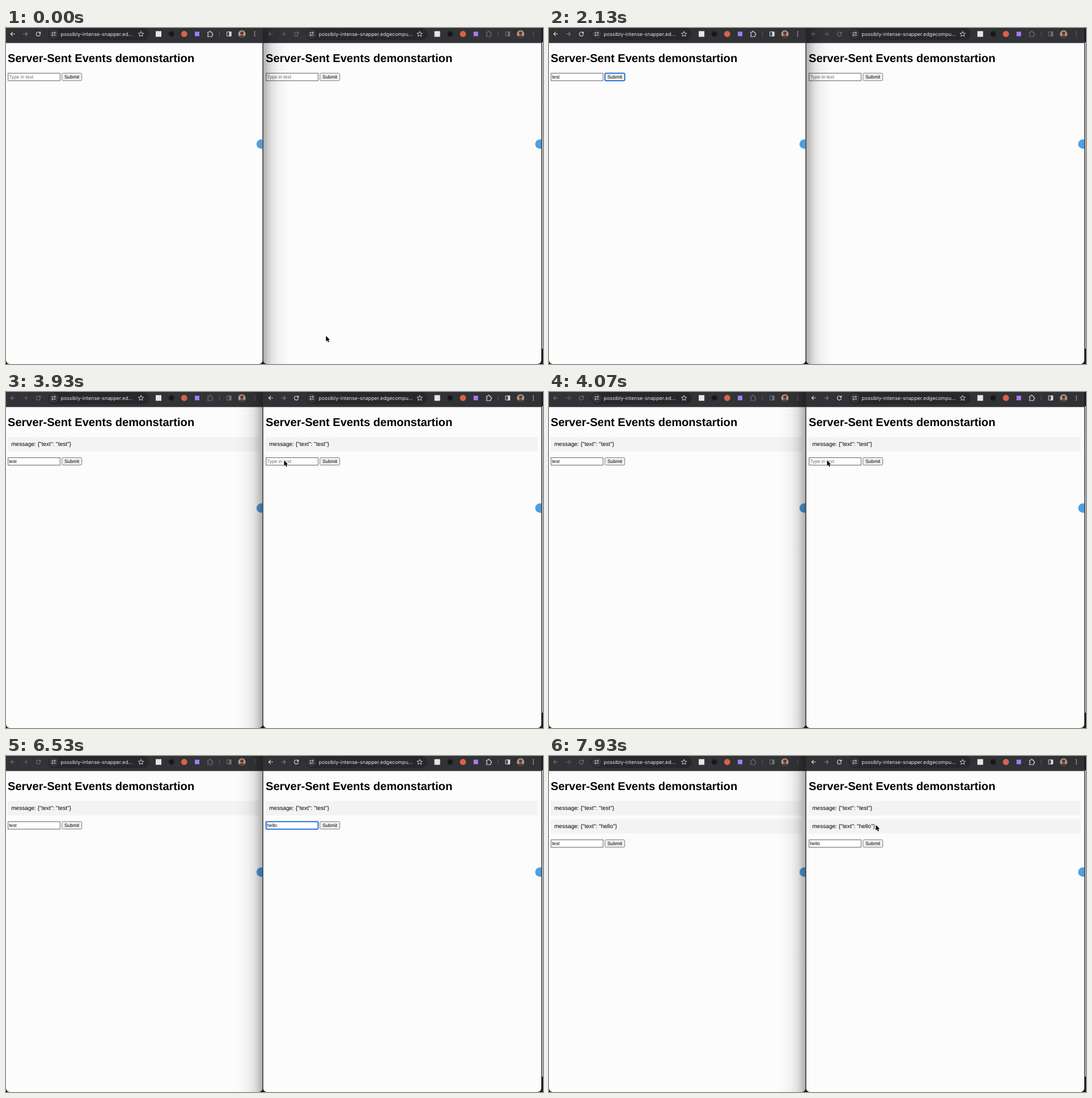
Animation, 947 px wide and 592 px high, one loop 8000 ms. Source, as an HTML page with a canvas:

```html
<!DOCTYPE html>
<html lang="en">
<head>
<meta charset="utf-8">
<title>Server-Sent Events demonstration</title>
<style>
html, body { margin: 0; width: 100%; height: 100%; overflow: hidden; background: #1c1c1e; }
canvas { display: block; width: 947px; height: 592px; }
</style>
</head>
<body>
<canvas id="stage" width="947" height="592"></canvas>
<script>
const LOOP = 8000, SPLIT = 453, RIGHT_EDGE = 944, H = 592;
const SANS = '"Liberation Sans", Arial, sans-serif';
const UI = 'Inter, Roboto, sans-serif';
const BLUE = '#0f66d0';
const ctx = document.getElementById('stage').getContext('2d');
ctx.textRendering = 'geometricPrecision';

// Moments of the scene, in ms
const T = {
  leftFocus: 1070, leftTab: 1870, press: 2200, release: 2330, firstMessage: 2470,
  switchWindow: 3930, rightFocus: 4730, rightClick: 7470, secondMessage: 7600
};
const LEFT_KEYS = [1270, 1400, 1530, 1670];
const RIGHT_KEYS = [5600, 5730, 5860, 5960, 6080];

// Pointer stops: time, x, y
const PATH = [
  [0, 564, 542], [70, 564, 542], [130, 88, 86], [2900, 88, 86], [3000, 80, 98],
  [3130, 54, 113], [3200, 50, 114], [3270, 73, 114], [3330, 240, 111], [3400, 457, 106],
  [3670, 457, 106], [3870, 490, 120], [6800, 490, 120], [7200, 576, 121], [8000, 576, 121]
];

function text(str, x, y, size, color, family = SANS, weight = 400) {
  ctx.font = `${weight} ${size}px ${family}`;
  ctx.fillStyle = color;
  ctx.fillText(str, x, y);
}

function rect(x, y, w, h, color) {
  ctx.fillStyle = color;
  ctx.fillRect(x, y, w, h);
}

function rounded(x, y, w, h, r, fill, stroke, line = 1) {
  ctx.beginPath();
  ctx.roundRect(x, y, w, h, r);
  if (fill) { ctx.fillStyle = fill; ctx.fill(); }
  if (stroke) { ctx.strokeStyle = stroke; ctx.lineWidth = line; ctx.stroke(); }
}

function disc(x, y, r, color) {
  ctx.beginPath();
  ctx.arc(x, y, r, 0, 7);
  ctx.fillStyle = color;
  ctx.fill();
}

function trace(d, x, y, color, line = 1.2, fill) {
  ctx.save();
  ctx.translate(x, y);
  const p = new Path2D(d);
  if (fill) { ctx.fillStyle = fill; ctx.fill(p); }
  ctx.strokeStyle = color;
  ctx.lineWidth = line;
  ctx.lineJoin = 'round';
  ctx.stroke(p);
  ctx.restore();
}

function star(x, y, color) {
  let d = '';
  for (let i = 0; i < 10; i++) {
    const a = i * Math.PI / 5 - Math.PI / 2, r = i % 2 ? 2.2 : 5;
    d += `${i ? 'L' : 'M'}${Math.cos(a) * r} ${Math.sin(a) * r}`;
  }
  trace(d + 'Z', x, y + .3, color, 1);
}

function avatar(x, y) {
  ctx.save();
  ctx.beginPath();
  ctx.arc(x, y, 6.5, 0, 7);
  ctx.clip();
  rect(x - 7, y - 7, 14, 14, '#b9988a');
  disc(x, y - 1.5, 3, '#5f3d32');
  ctx.beginPath();
  ctx.ellipse(x, y + 6, 5, 4, 0, 0, 7);
  ctx.fill();
  ctx.restore();
}

function toolbar(x, tools, pillWidth, url, active) {
  const y = 10.5;
  const ink = active ? '#d5d6d9' : '#6e6f73', faint = active ? '#7f8084' : '#5e5f63';
  rect(x - 3, 0, 500, 26.5, active ? '#313235' : '#323336');
  const arrow = 'M4 0H-3.6M0 -3.7L-3.7 0L0 3.7';
  trace(arrow, x + 12, y, ink);
  ctx.save();
  ctx.translate(x * 2 + 68, 0);
  ctx.scale(-1, 1);
  trace(arrow, x + 34, y, faint);
  ctx.restore();
  trace('M3.1 -1.8A3.6 3.6 0 1 0 3.6 .6M3.7 -4V-1.2H.9', x + 57, y, ink);

  rounded(x + 74, 0, pillWidth, 21.5, 10.5, '#27282b');
  disc(x + 84, y, 8, '#37383c');
  trace('M-3.8 -2H-.4M3.8 2H.4', x + 84, y, '#dcdde0', 1);
  ctx.strokeStyle = '#dcdde0';
  ctx.lineWidth = 1;
  for (const [dx, dy] of [[2, -2], [-2, 2]]) {
    ctx.beginPath();
    ctx.arc(x + 84 + dx, y + dy, 1.2, 0, 7);
    ctx.stroke();
  }
  text(url, x + 96.5, 13.7, 8.8, '#e4e5e8', UI);
  star(x + 60 + pillWidth, y, '#cfd0d3');

  rect(tools + 264, 5.5, 10, 10, '#e6e6e6');
  disc(tools + 291.8, y, 4.8, '#17181a');
  disc(tools + 314.3, y, 5.4, '#d9614c');
  rect(tools + 333, 6.5, 8, 8, '#a07df0');
  trace('M-4 -3H-1.3V-4A1.3 1.3 0 0 1 1.3 -4V-3H3.6V-.6H4A1.3 1.3 0 0 1 4 2H3.6V4.8H-4V2.4A1.4 1.4 0 0 0 -4 -.5Z',
    tools + 359.7, y, ink, 1.1);
  rect(tools + 376, 6, 1, 9, '#5b5c60');
  rounded(tools + 389.5, 6.7, 7.6, 7.6, .7, null, ink, 1.1);
  rect(tools + 393.3, 6.5, 4, 8, ink);
  avatar(tools + 416, y);
  for (const dy of [-3.6, 0, 3.6]) disc(tools + 438.5, y + dy, .95, ink);
}

function form(x, y, f) {
  const b = f.focus === 'input';
  rounded(x + .6, y + .6, 91.8, 13.2, b ? 1 : .3, '#fff', b ? BLUE : '#7c7c7c', b ? 1.8 : 1.2);
  text(f.value || 'Type in text', x + 2.2, y + 10, 8.4, f.value ? '#000' : '#686868');
  if (f.caret) {
    ctx.font = `8.4px ${SANS}`;
    rect(x + 2.2 + ctx.measureText(f.value).width, y + 2.6, .9, 9, '#000');
  }
  const s = f.focus === 'button';
  rounded(x + 95.6, y + .6, 35, 13.2, 2, f.pressed ? '#dcdcdc' : '#efefef', s ? BLUE : '#7c7c7c', s ? 1.8 : 1);
  text('Submit', x + 100, y + 10, 8.4, '#000');
}

function page(x, width, messages, f) {
  rect(x - 6, 26, 500, H, '#fcfcfc');
  text('Server-Sent Events demonstartion', x, 60.2, 20.08, '#000', SANS, 700);
  messages.forEach((m, i) => {
    rect(x, 79.4 + 32 * i, width, 25.2, '#f3f3f3');
    text(`message: {"text": "${m}"}`, x + 6.2, 95.3 + 32 * i, 10.08, '#000');
  });
  const n = messages.length;
  form(x, 79 + (n ? 4 + 32 * n : 0), f);
}

function windowClip(x, w, draw) {
  ctx.save();
  ctx.beginPath();
  ctx.roundRect(x, -10, w, H + 10, 7);
  ctx.clip();
  draw();
  ctx.restore();
}

function shadow(dir) {
  const g = ctx.createLinearGradient(SPLIT, 0, SPLIT + dir * 50, 0);
  [[0, .32], [.12, .23], [.3, .11], [.55, .04], [.8, .01], [1, 0]]
    .forEach(([p, a]) => g.addColorStop(p, `rgba(0,0,0,${a})`));
  rect(dir > 0 ? SPLIT : SPLIT - 50, 0, 50, H, g);
}

function pointer(t) {
  if ((t >= LEFT_KEYS[0] && t < 2900) || (t >= RIGHT_KEYS[0] && t < 6800)) return;
  const i = Math.max(1, PATH.findIndex(p => p[0] > t));
  const [t0, x0, y0] = PATH[i - 1], [t1, x1, y1] = PATH[i];
  const k = (t - t0) / (t1 - t0);
  const x = x0 + (x1 - x0) * k, y = y0 + (y1 - y0) * k;
  const beam = (t >= 130 && t < 2900) || (t >= T.rightFocus && t < 6950);
  if (beam) {
    const d = 'M-1.8 -4.5Q0 -4.5 0 -3.4Q0 -4.5 1.8 -4.5M0 -3.4V4M-1.8 5Q0 5 0 4Q0 5 1.8 5';
    trace(d, x, y + 1.3, '#fff', 2);
    trace(d, x, y + 1.3, '#111', 1);
  } else {
    const d = 'M0 0V9.4L2.1 7.5L3.6 10.9L5.3 10.2L3.8 6.9H6.6Z';
    trace(d, x + .4, y + .6, '#fff', 1.5);
    trace(d, x + .4, y + .6, '#000', .2, '#000');
  }
}

const typed = (word, keys, t) => word.slice(0, keys.filter(k => t >= k).length);

// The caret blinks each half second, starting over with every key
function caret(start, keys, t) {
  const last = [start, ...keys].filter(k => t >= k).pop();
  return (t - last) % 1000 < 440 || (t - last) % 1000 > 940;
}

function draw(t) {
  const leftActive = t < T.switchWindow;
  const messages = [];
  if (t >= T.firstMessage) messages.push('test');
  if (t >= T.secondMessage) messages.push('hello');

  const left = { value: typed('test', LEFT_KEYS, t) };
  if (t >= T.leftFocus && t < T.leftTab) {
    left.focus = 'input';
    left.caret = caret(T.leftFocus, LEFT_KEYS, t);
  } else if (t >= T.leftTab && leftActive) {
    left.focus = 'button';
    left.pressed = t >= T.press && t < T.release;
  }
  const right = { value: typed('hello', RIGHT_KEYS, t) };
  if (t >= T.rightFocus && t < T.rightClick) {
    right.focus = 'input';
    right.caret = caret(T.rightFocus, RIGHT_KEYS, t);
  }
  right.pressed = t >= T.rightClick && t < T.secondMessage;

  rect(0, 0, 947, H, '#1c1c1e');
  rect(945, 25, 2, 540, '#b0b0b0');
  rect(944, 130, 3, 1, '#6c6c6c');

  const drawLeft = () => windowClip(0, SPLIT - .4, () => {
    page(3, 444, messages, left);
    disc(450, 204.5, 8.3, '#4f9fe0');
    toolbar(0, 0, 178, 'possibly-intense-snapper.ed...', leftActive);
  });
  const drawRight = () => windowClip(SPLIT + .4, RIGHT_EDGE - SPLIT - .4, () => {
    page(458, 480, messages, right);
    disc(941.5, 204.5, 8.3, '#4f9fe0');
    toolbar(455, 491.5, 214.5, 'possibly-intense-snapper.edgecompu...', !leftActive);
  });
  if (leftActive) { drawRight(); shadow(1); drawLeft(); }
  else { drawLeft(); shadow(-1); drawRight(); }
  rect(SPLIT - .5, 0, 1, H - 6, '#303032');
  pointer(t);
}

const begin = performance.now();
function tick() {
  draw((performance.now() - begin) % LOOP);
  requestAnimationFrame(tick);
}
tick();
</script>
</body>
</html>
```
